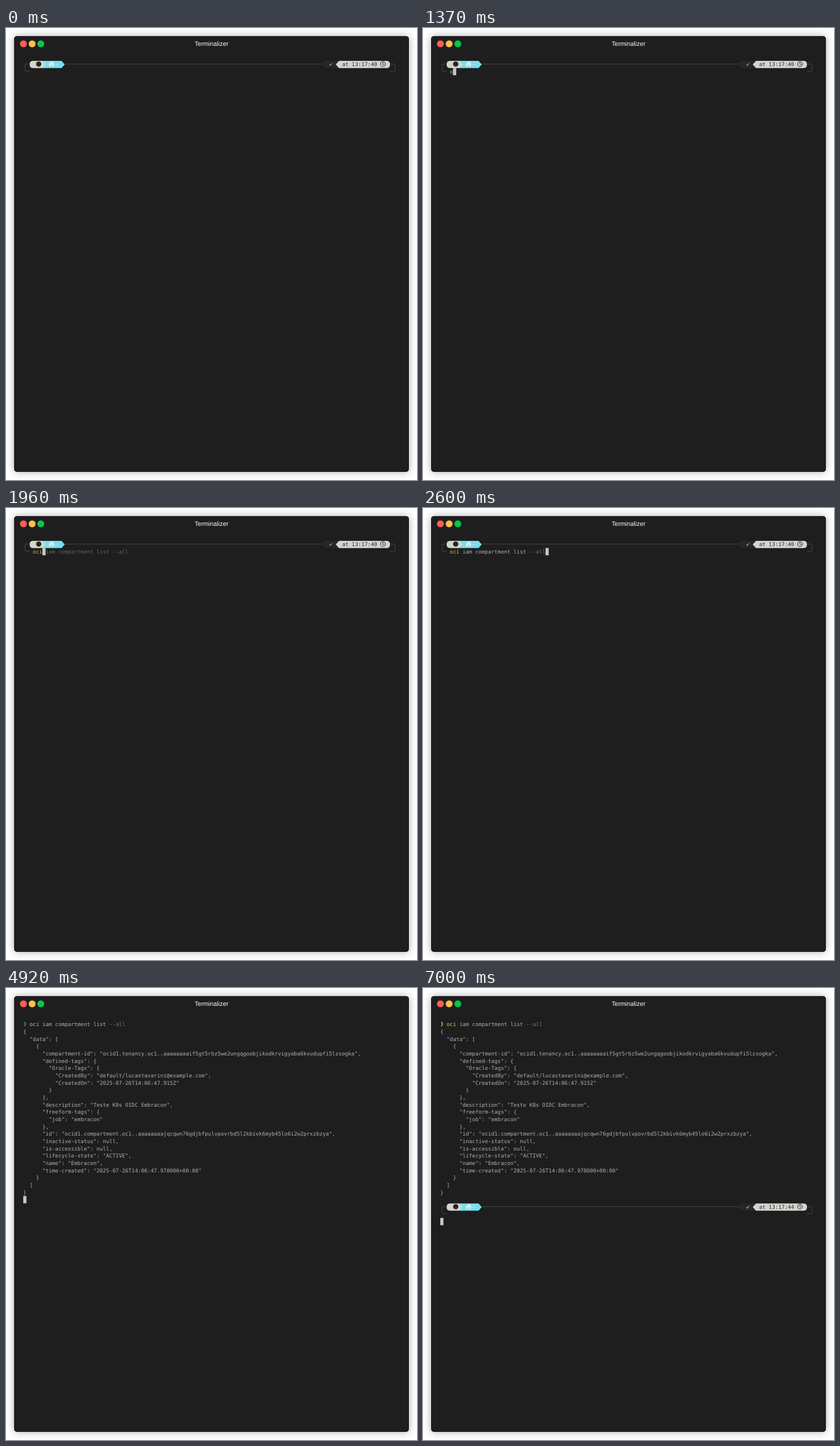
Write an HTML page that moves like this. It is 714 px wide and 784 px high and loops after 7770 ms.

```html
<!DOCTYPE html>
<html lang="en">
<head>
<meta charset="utf-8">
<title>Terminal</title>
<style>
html, body { margin: 0; width: 100%; height: 100%; overflow: hidden; background: #fff; }
#window { position: absolute; left: 14px; top: 14px; width: 686px; height: 756px; border-radius: 5px;
  background: #1e1e1e; box-shadow: 0 0 14px rgba(0, 0, 0, .32); }
svg { position: absolute; left: 0; top: 0; }
text { font: 9.2px "DejaVu Sans Mono", "DejaVu Sans", monospace; white-space: pre; text-rendering: geometricPrecision; }
.title { font: 10.9px "Liberation Sans", Arial, sans-serif; }
.bold { font-weight: bold; }
</style>
</head>
<body>
<div id="window"></div>
<svg width="714" height="784" viewBox="0 0 714 784">
  <circle cx="30.3" cy="27.4" r="6" fill="#ff5f58"/>
  <circle cx="45.4" cy="27.4" r="6" fill="#ffbf48"/>
  <circle cx="60.5" cy="27.4" r="6" fill="#08c653"/>
  <text class="title" x="357" y="31.4" text-anchor="middle" fill="#fff">Terminalizer</text>
  <g id="screen"></g>
</svg>
<script>
const LOOP = 7770, LEFT = 30, TOP = 56.7, CELL = 5.54, ROW = 12.67;
const GREY = '#afafaf', DIM = '#626566', LIGHT = '#d5d5d0', BLUE = '#75dff2',
  PURPLE = '#ae89fe', DARK = '#262626', RULE = '#474747', RED = '#f78787';
const COMMAND = 'oci iam compartment list --all';

const OUTPUT = `{
  "data": [
    {
      "compartment-id": "ocid1.tenancy.oc1..aaaaaaaaif5gt5rbz5we2ungqgoobjikodkrvigyaba6kvudupfi5lzsogka",
      "defined-tags": {
        "Oracle-Tags": {
          "CreatedBy": "default/lucastavarini@example.com",
          "CreatedOn": "2025-07-26T14:06:47.915Z"
        }
      },
      "description": "Teste K8s OIDC Embracon",
      "freeform-tags": {
        "job": "embracon"
      },
      "id": "ocid1.compartment.oc1..aaaaaaaajqcqwn76gdjbfpulvpovrbd5l2kbivk6myb45lo6i2w2prxzbzya",
      "inactive-status": null,
      "is-accessible": null,
      "lifecycle-state": "ACTIVE",
      "name": "Embracon",
      "time-created": "2025-07-26T14:06:47.978000+00:00"
    }
  ]
}`.split('\n');

const x = col => LEFT + col * CELL;
const y = row => TOP + row * ROW;

function text(col, row, str, fill = GREY, cls = '') {
  const indent = str.search(/\S/);
  return `<text class="${cls}" x="${x(col + indent)}" y="${y(row) + 9.5}" fill="${fill}">${str.trim()}</text>`;
}
const path = (d, fill, stroke = 'none', width = 1) =>
  `<path d="${d}" fill="${fill}" stroke="${stroke}" stroke-width="${width}"/>`;
const circle = (cx, cy, r, fill) => `<circle cx="${cx}" cy="${cy}" r="${r}" fill="${fill}"/>`;

function cursor(col, row, char = '') {
  const block = `<rect x="${x(col)}" y="${y(row)}" width="${CELL}" height="${ROW}" fill="#c7c7c7"/>`;
  return block + (char.trim() && text(col, row, char, '#1e1e1e'));
}

// Segment between two columns; each end is 'round', 'point' or 'flat'.
function segment(from, to, row, fill, start, end) {
  const t = y(row) + .3, b = y(row) + 12.7, m = (t + b) / 2, l = x(from), r = x(to);
  const li = start === 'flat' ? l : l + CELL, ri = end === 'flat' ? r : r - CELL;
  const right = { flat: `V${b}`, point: `L${r} ${m}L${ri} ${b}`, round: `Q${r} ${t} ${r} ${m}Q${r} ${b} ${ri} ${b}` }[end];
  const left = { flat: '', point: `L${l} ${m}`, round: `Q${l} ${b} ${l} ${m}Q${l} ${t} ${li} ${t}` }[start];
  return path(`M${li} ${t}H${ri}${right}H${li}${left}Z`, fill);
}

function prompt(row, time, tick, context) {
  const m = y(row) + 5.8, low = m + 12.6, head = context ? 67 : 94;
  const house = path(`M73.6 ${m + .2}l5.5-5 2.4 2.2v-1.5h1.4v2.8l1.8 1.5h-1.4v4.4h-3v-3h-2.4v3h-3v-4.4z`, '#e6e8e4');
  const clock = path(`M650.6 ${m}a4.2 4.2 0 1 0 8.4 0a4.2 4.2 0 1 0-8.4 0M654.8 ${m - 2.7}v2.9l2 1.2`, 'none', DARK, 1.1);
  const rules = path(`M41 ${m}H35q-2 0-2 2V${low - 2}q0 2 2 2H41.5M${x(13)} ${m}H${x(head)}` +
    `M667 ${m}H674q2 0 2 2V${low - 2}q0 2-2 2H667`, 'none', RULE);
  const kube = context
    ? segment(71, 99, row, PURPLE, 'point', 'flat') + text(73, row, 'at context-cfb46uxp3ka', LIGHT) +
      circle(565.5, m + .3, 3, '#cdb9ec')
    : '';
  return rules +
    segment(6, 13, row, BLUE, 'flat', 'point') + segment(2, 7, row, LIGHT, 'round', 'point') +
    circle(56.8, m, 4.6, DARK) + house + text(10, row, '~', '#e6e8e4') +
    segment(head, context ? 72 : 99, row, '#25282a', 'round', 'flat') + text(head + 2, row, '✔', tick) +
    kube + segment(98, 115, row, LIGHT, 'point', 'round') + text(100, row, 'at ' + time, DARK) + clock;
}

function command(col, row, color) {
  return text(col, row, 'oci', color) + text(col + 4, row, 'iam compartment list') +
    text(col + 25, row, '--all', '#6d7778');
}

function typing(count, color, { suggest = true, context = false, bold = true } = {}) {
  const rest = suggest ? COMMAND.slice(count) : '';
  return prompt(0, '13:17:40', '#c8a150', context) +
    (count ? text(3, 1, COMMAND.slice(0, count), color, bold ? 'bold' : '') : '') +
    (rest.length > 1 ? text(4 + count, 1, rest.slice(1), DIM) : '') +
    cursor(3 + count, 1, rest[0]);
}

function running(arrow, color) {
  return path(`M31.6 ${y(0) + 2.4}q2.3 1.8 2.3 3.4t-2.3 3.4`, 'none', arrow, 1.5) + command(2, 0, color);
}
const result = (arrow, color) =>
  running(arrow, color) + OUTPUT.map((line, i) => text(0, i + 1, line)).join('');
const finished = () => result('#9be03a', '#c5d850') + prompt(25, '13:17:44', '#a8e03a');

const steps = [
  [0, prompt(0, '13:17:40', '#c2a662')],
  [290, typing(0, GREY, { suggest: false })],
  [1370, typing(1, GREY, { suggest: false, bold: false })],
  [1470, typing(1, RED)],
  [1610, typing(2, RED)],
  [1710, typing(2, RED, { context: true })],
  [1860, typing(3, RED, { context: true })],
  [1960, typing(3, '#c3c23c', { bold: false })],
  [2600, prompt(0, '13:17:40', '#b9c03a') + command(3, 1, '#c3c23c') + cursor(33, 1)],
  [4180, running('#aab33a', '#d2cc50') + cursor(0, 1)],
  [4920, result('#0ccb55', '#d8b951') + cursor(0, 24)],
  [5200, finished() + cursor(3, 26)],
  [7000, finished() + cursor(0, 27)]
];

const screen = document.getElementById('screen');
screen.innerHTML = steps.map(([, markup]) => `<g visibility="hidden">${markup}</g>`).join('');
const scenes = [...screen.children];
const begin = performance.now();
let shown = -1;

function draw() {
  const t = (performance.now() - begin) % LOOP;
  const current = steps.findLastIndex(([start]) => start <= t);
  if (current !== shown) {
    scenes.forEach((scene, i) => scene.setAttribute('visibility', i === current ? 'visible' : 'hidden'));
    shown = current;
  }
  requestAnimationFrame(draw);
}
draw();
</script>
</body>
</html>
```
